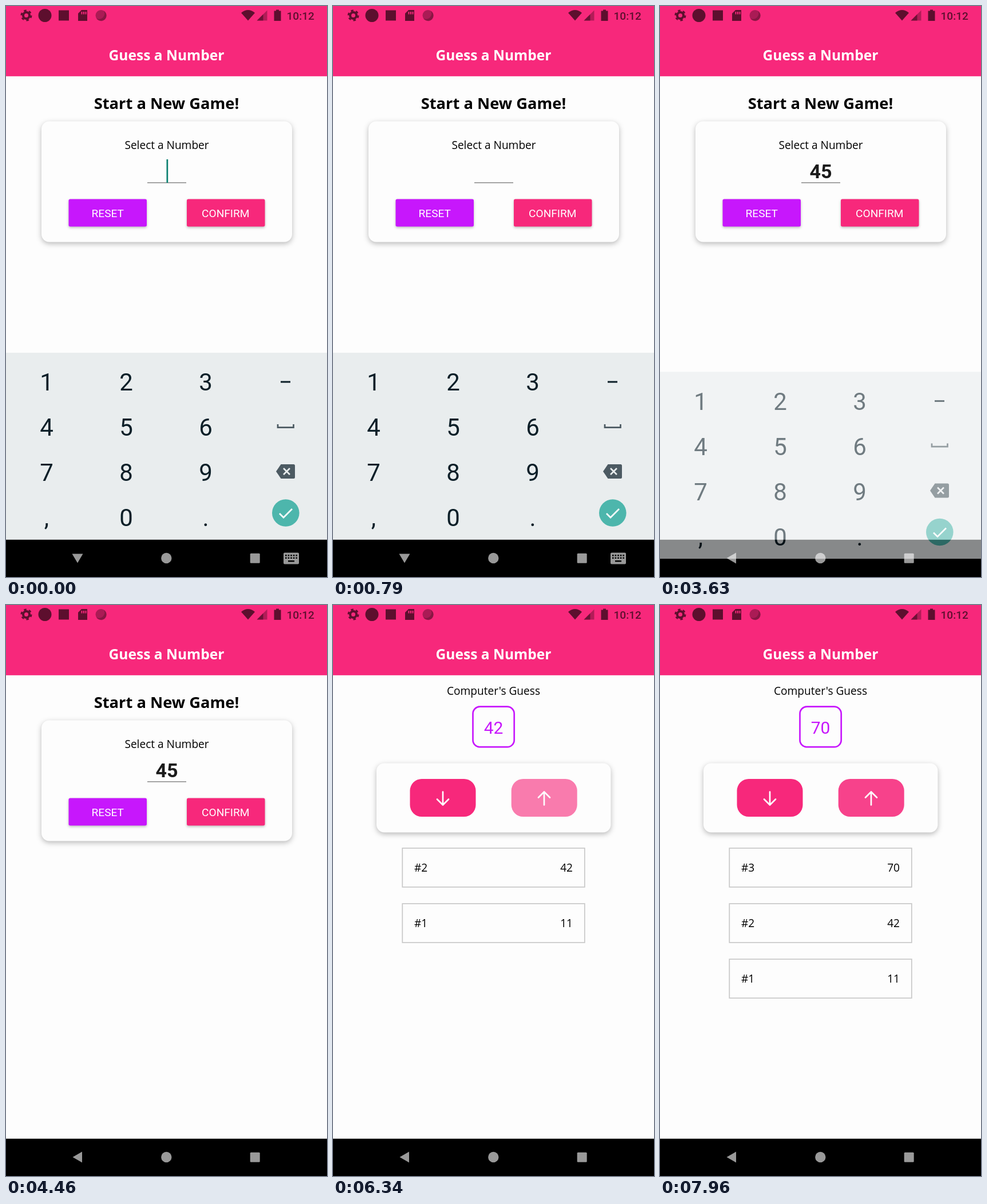
Animation of 561 by 998 pixels, one loop 8000 ms. Source, as an HTML page:

```html
<!DOCTYPE html>
<html lang="en">
<head>
<meta charset="utf-8">
<title>Guess a Number</title>
<style>
  html, body { margin: 0; width: 100%; height: 100%; overflow: hidden; background: #fdfdfd; }
  svg { display: block; width: 100vw; height: 100vh; }
  text { font: 19.1px "Open Sans", sans-serif; }
  .mid, .keys text { text-anchor: middle; }
  .end { text-anchor: end; }
  .white { fill: #fff; }
  .title { font-size: 24.57px; font-weight: 700; }
  .heading { font-size: 27.3px; font-weight: 700; }
  .label { font-family: Roboto, sans-serif; }
  .entry { font: 700 34.1px Roboto, sans-serif; fill: #1b1b1b; }
  .guess { font: 30px Roboto, sans-serif; fill: #c717fc; }
  .clock { font: 500 19.1px Roboto, sans-serif; }
  .keys text { font: 42px Roboto, sans-serif; fill: #0c1f28; }
  .card { fill: #fdfdfd; filter: drop-shadow(0 3px 5px rgba(0, 0, 0, .27)); }
  .button { filter: drop-shadow(0 2px 2px rgba(0, 0, 0, .25)); }
  .primary { fill: #f7287b; }
  .accent { fill: #c717fc; }
  .line { fill: none; stroke-width: 2.7; }
  .arrow { stroke: #fff; stroke-linecap: round; stroke-linejoin: round; }
  .row rect { fill: none; stroke: #c8c8c8; stroke-width: 1.7; }
</style>
</head>
<body>
<svg viewBox="0 0 561 998" preserveAspectRatio="none">
  <rect width="561" height="998" fill="#fdfdfd"/>

  <g id="startScreen">
    <text class="mid heading" x="280.5" y="180">Start a New Game!</text>
    <rect class="card" x="62" y="201.500" width="438" height="211" rx="13.7"/>
    <text class="mid" x="281" y="249.500">Select a Number</text>
    <path d="M247 308.800H315" stroke="#707070" stroke-width="1.300"/>
    <text id="entry" class="mid entry" x="281" y="300.500"></text>
    <rect id="cursor" y="268" width="2.700" height="41" fill="#0a8070"/>
    <rect class="button accent" x="109.500" y="337.500" width="136.500" height="48" rx="2.700"/>
    <rect class="button primary" x="316" y="337.500" width="136.500" height="48" rx="2.700"/>
    <text class="mid label white" x="177.800" y="369.300">RESET</text>
    <text class="mid label white" x="383.800" y="369.300">CONFIRM</text>
  </g>

  <g id="gameScreen">
    <text class="mid" x="280.500" y="156.500">Computer's Guess</text>
    <rect class="line" x="244.500" y="177.700" width="72.200" height="70.500" rx="12.300" stroke="#c717fc"/>
    <text id="guess" class="mid guess" x="280.500" y="225.200"></text>
    <rect class="card" x="76" y="276.500" width="409.500" height="121" rx="13.700"/>
    <g>
      <rect class="primary" x="134.500" y="304" width="115" height="66" rx="20.500"/>
      <path class="line arrow" d="M192 326.500V349M182 339.500L192 349.500L202 339.500"/>
    </g>
    <g id="higher">
      <rect class="primary" x="311.700" y="304" width="115" height="66" rx="20.500"/>
      <path class="line arrow" d="M369 349.500V327M359 336.500L369 326.500L379 336.500"/>
    </g>
    <g id="rows"></g>
  </g>

  <rect class="primary" width="561" height="122.800"/>
  <text class="mid title white" x="280.500" y="95.300">Guess a Number</text>

  <g opacity=".62">
    <circle cx="35.500" cy="16.500" r="5.500" fill="none" stroke="#000" stroke-width="4"/>
    <circle cx="35.500" cy="16.500" r="8.500" fill="none" stroke="#000" stroke-width="3" stroke-dasharray="4.450"/>
    <circle cx="68" cy="16.500" r="11.500"/>
    <rect x="92" y="7.500" width="18" height="18"/>
    <path fill-rule="evenodd" d="M132 7h10v19h-16V13zM131.500 10v4.500h2v-4.500zM135 10v4.500h2v-4.500zM138.500 10v4.500h2v-4.500z"/>
    <circle cx="166" cy="16.500" r="9.500" opacity=".5"/>
    <path d="M171 8.500A9.500 9.500 0 1 1 158 21.500A9.500 9.500 0 0 0 171 8.500" opacity=".45"/>
    <path d="M411 12Q423 2 435 12L423 25.500Z"/>
    <path d="M438.500 25.500L456.500 7.500V25.500Z" opacity=".45"/>
    <path d="M438.500 25.500L449.500 14.500V25.500Z" opacity=".8"/>
    <path d="M472 6.500h5v2h3.500v17.500h-12V8.500h3.500z"/>
    <text class="clock" x="490.500" y="23.700">10:12</text>
  </g>

  <rect y="932.800" width="561" height="66"/>
  <g id="keyboard" class="keys">
    <rect y="606" width="561" height="327" fill="#e9edee"/>
    <rect y="932.800" width="561" height="66"/>
    <g id="digits"></g>
    <rect x="480" y="655.500" width="17" height="3" fill="#0c1f28"/>
    <path class="line" d="M475 731V736.700H502.500V731" stroke="#4c5a62"/>
    <path d="M472 813.500L480.500 801H502.500Q505 801 505 803.500V823.500Q505 826 502.500 826H480.500Z" fill="#4c5a62"/>
    <path class="line" d="M485 808L496 819M496 808L485 819" stroke="#e9edee"/>
    <circle cx="488.800" cy="886" r="23.800" fill="#4db6ac"/>
    <path class="line" d="M478 887L485 894L500 879" stroke="#fff"/>
  </g>

  <g fill="#fff" opacity=".6">
    <path id="back"/>
    <circle cx="280.300" cy="965" r="9.200"/>
    <rect x="426.700" y="956.700" width="17" height="17" rx="1.500"/>
    <path id="keyboardIcon" fill-rule="evenodd"/>
  </g>
</svg>

<script>
const LOOP = 8000;
const TYPED = [[0, ""], [1300, "4"], [1900, "45"]];
const GUESSES = [[0, 11], [6215, 42], [7781, 70]];
const KEYBOARD_EXIT = 3505;
const GAME_START = 5400;
const FADE_IN = 150, FADE_OUT = 250, PRESSED = 0.2;

const el = id => document.getElementById(id);
const clamp = v => Math.max(0, Math.min(1, v));
const easeInOut = u => u < 0.5 ? 2 * u * u : 1 - 2 * (1 - u) ** 2;
const show = (id, on) => el(id).setAttribute("visibility", on ? "visible" : "hidden");
const reached = (steps, t) => steps.filter(([at]) => at <= t);

el("digits").innerHTML = [..."123456789,0."].map((key, i) =>
  `<text x="${71 + i % 3 * 139}" y="${672.3 + Math.floor(i / 3) * 79}">${key}</text>`).join("");

// Outline of the nav bar keyboard glyph, with its keys cut out.
let glyph = "M487 955.500h23q2 0 2 2v16q0 2 -2 2h-23q-2 0 -2 -2v-16q0 -2 2 -2z";
for (let i = 0; i < 10; i++)
  glyph += `M${488 + i % 5 * 4.6} ${959 + Math.floor(i / 5) * 4.5}h2.600v2.600h-2.600z`;
el("keyboardIcon").setAttribute("d", glyph + "M493 969h11v2.600h-11z");

// The button dims while pressed, then brightens again from the moment of release.
function buttonOpacity(t) {
  for (const [release] of GUESSES.slice(1)) {
    const since = t - release;
    if (since >= -FADE_IN && since < 0)
      return 1 - (1 - PRESSED) * easeInOut((since + FADE_IN) / FADE_IN);
    if (since >= 0 && since < FADE_OUT)
      return PRESSED + (1 - PRESSED) * easeInOut(since / FADE_OUT);
  }
  return 1;
}

let rowCount = 0;
function drawRows(guesses) {
  if (guesses.length === rowCount) return;
  rowCount = guesses.length;
  el("rows").innerHTML = guesses.map(([, value], i) =>
    `<g class="row" transform="translate(0 ${(rowCount - 1 - i) * 97})">
      <rect x="121.300" y="425" width="318.500" height="68"/>
      <text x="142" y="466.300">#${i + 1}</text>
      <text class="end" x="419" y="466.300">${value}</text>
    </g>`).join("");
}

function draw(t) {
  const playing = t >= GAME_START;
  show("startScreen", !playing);
  show("gameScreen", playing);

  const [typedAt, value] = reached(TYPED, t).pop();
  const open = t < KEYBOARD_EXIT;
  el("entry").textContent = value;
  el("cursor").setAttribute("x", 280.5 + value.length * 9.8);
  show("cursor", open && (t - typedAt) % 1000 < 500);

  const exit = clamp((t - KEYBOARD_EXIT) / 150) ** 5;
  el("keyboard").setAttribute("transform", `translate(0 ${80 * exit})`);
  el("keyboard").setAttribute("opacity", 1 - exit);
  show("keyboardIcon", open);
  el("back").setAttribute("d", open ? "M115.500 957.500H134.500L125 973.500Z" : "M116.500 965L133 955.500V974.500Z");

  const guesses = reached(GUESSES, t);
  el("guess").textContent = guesses[guesses.length - 1][1];
  el("higher").setAttribute("opacity", buttonOpacity(t));
  drawRows(guesses);
}

const start = performance.now();
function tick() {
  draw((performance.now() - start) % LOOP);
  requestAnimationFrame(tick);
}
tick();
</script>
</body>
</html>
```
